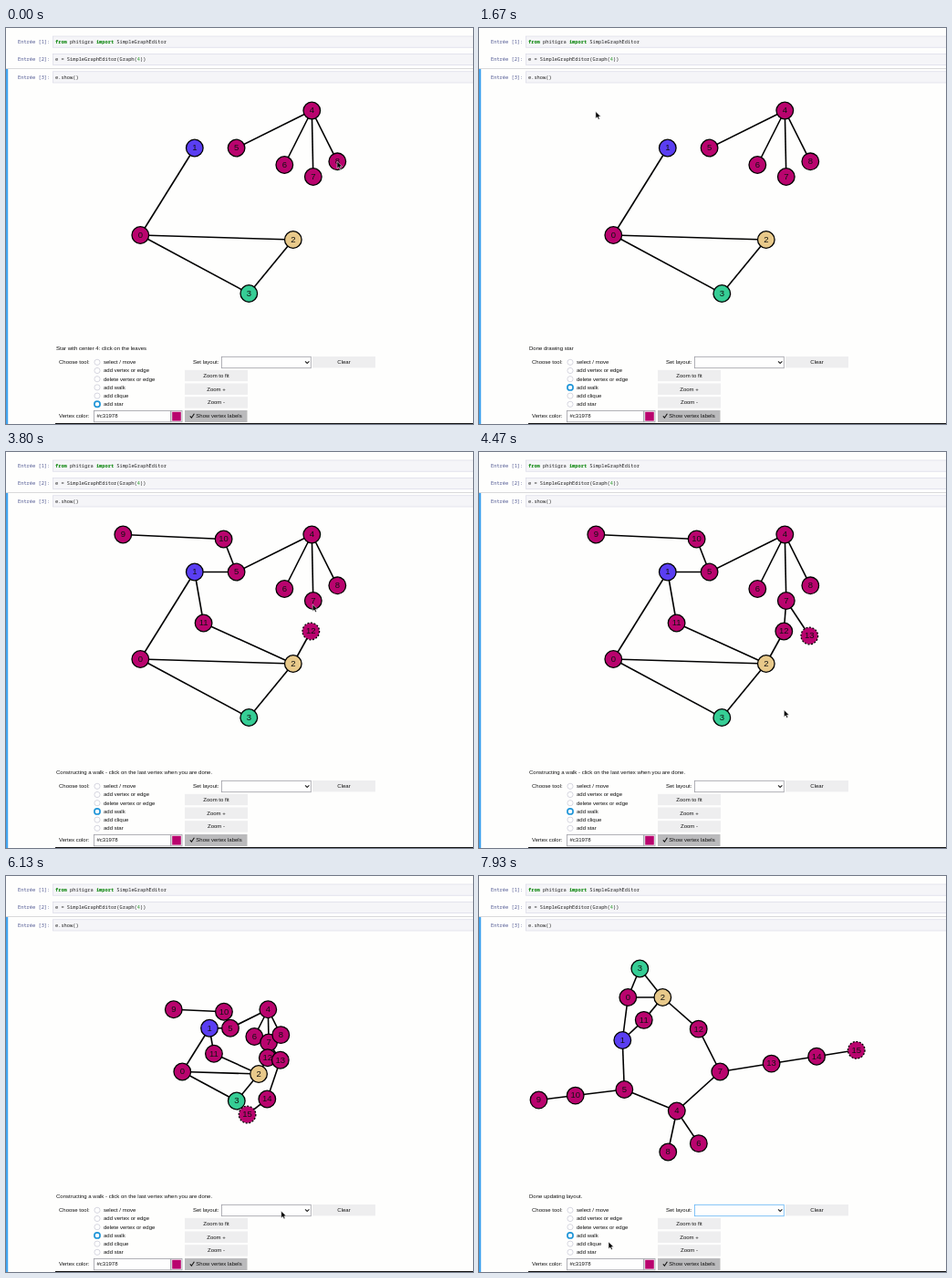
Write an HTML page that moves like this. It is 512x434 px and loops after 8 s.

```html
<!DOCTYPE html>
<html lang="fr">
<head>
<meta charset="utf-8">
<title>Graph editor</title>
<style>
  html, body { margin: 0; width: 100%; height: 100%; overflow: hidden; background: #fefefd; }
  svg { display: block; width: 512px; height: 434px; }
  text { font: 6px "Liberation Sans", Arial, sans-serif; fill: #111; white-space: pre; }
  .mid { text-anchor: middle; }
  .code { font: 5.35px "Noto Sans Mono", "DejaVu Sans Mono", monospace; fill: #222; }
  .prompt { fill: #4d5590; }
  .key { fill: #008000; font-weight: bold; }
  .num { fill: #2a9a2a; }
  .label { font-size: 9.5px; text-anchor: middle; }
  .cell { fill: #f5f5f8; stroke: #d6d6e4; stroke-width: .6; }
  .button { fill: #eeeeef; }
  .field { fill: #fefefe; stroke: #9e9ea6; stroke-width: .8; }
  .edge { stroke: #000; stroke-width: 1.6; }
  .node { stroke: #000; stroke-width: 1.3; }
  .item { fill: #77777f; }
  .pointer { fill: #000; stroke: #fff; stroke-width: .5; }
</style>
</head>
<body>
<svg id="stage" viewBox="0 0 512 434"></svg>
<script>
const LOOP = 8000;
const ACCENT = '#b9046e';
const STAR_DONE = 720, TOOL_AT = 1230, WALK_AT = 1750, WALK_STEP = 315;
const ZOOM_AT = 5650, OPEN_AT = 6230, PICK_AT = 6960, LAYOUT_AT = 7060;
const stage = document.getElementById('stage');

function set(node, attrs) {
  for (const name in attrs) node.setAttribute(name, attrs[name]);
}
function add(tag, attrs = {}, parent = stage, text = '') {
  const node = document.createElementNS('http://www.w3.org/2000/svg', tag);
  set(node, attrs);
  if (text) node.textContent = text;
  parent.append(node);
  return node;
}
const rect = (x, y, width, height, attrs, parent) =>
  add('rect', { x, y, width, height, ...attrs }, parent);
const label = (x, y, text, cls = '', parent) =>
  add('text', { x, y, class: cls }, parent, text);
const show = (node, visible) => set(node, { visibility: visible ? 'visible' : 'hidden' });

// Notebook cells
const cells = [
  [['key', 'from'], ['', ' phitigra '], ['key', 'import'], ['', ' SimpleGraphEditor']],
  [['', 'e = SimpleGraphEditor(Graph('], ['num', '4'], ['', '))']],
  [['', 'e.show()']]
];
cells.forEach((parts, i) => {
  const y = 9 + 19.4 * i;
  rect(51.5, y, 461, 12.2, { class: 'cell' });
  label(13, y + 8, `Entrée [${i + 1}]:`, 'code prompt');
  const line = label(54, y + 8, '', 'code');
  parts.forEach(([cls, text]) => add('tspan', { class: cls }, line, text));
});
rect(0, 44, 512, .8, { fill: '#d0d0d4' });
rect(0, 45, 2.2, 389, { fill: '#42a5f0' });

// Graph as drawn by hand, then extended by a walk
const drawn = [
  [147, 227], [206.5, 131.5], [314.5, 232], [266, 291], [335, 90.5], [252.3, 131.5],
  [305, 150], [336.5, 163], [363, 146.3], [128, 90.5], [238.3, 95.5], [216.3, 187.5],
  [334, 196.5], [362, 201.5], [333, 287], [289.5, 321]
];
const walk = [9, 10, 5, 1, 11, 2, 12, 7, 13, 14, 15];
const clickAt = i => WALK_AT + WALK_STEP * i;
const bornAt = vertex => vertex > 8 ? clickAt(walk.indexOf(vertex)) : 0;
const edges = [
  ...[1, 2, 3].map(b => ({ a: 0, b, at: 0 })),
  { a: 2, b: 3, at: 0 },
  ...[5, 6, 7, 8].map(b => ({ a: 4, b, at: 0 })),
  ...walk.slice(1).map((b, i) => ({ a: walk[i], b, at: clickAt(i + 1) }))
];

// Spring layout: hubs are fixed, the rest hangs between or off them
const spring = {
  0: [163, 133], 1: [157, 180], 2: [201, 133], 3: [176, 101.5],
  4: [216.5, 257.5], 5: [159, 234], 7: [264, 214.5]
};
function between(vertex, a, b, bulge) {
  const [x1, y1] = spring[a], [x2, y2] = spring[b];
  const k = bulge / Math.hypot(x2 - x1, y2 - y1);
  spring[vertex] = [(x1 + x2) / 2 + (y2 - y1) * k, (y1 + y2) / 2 - (x2 - x1) * k];
}
function arm(chain, root, degrees, length, shrink = 1) {
  const angle = degrees * Math.PI / 180;
  let [x, y] = spring[root];
  for (const vertex of chain) {
    x += length * Math.cos(angle);
    y += length * Math.sin(angle);
    spring[vertex] = [x, y];
    length *= shrink;
  }
}
between(11, 1, 2, -2);
between(12, 2, 7, 10);
arm([13, 14, 15], 7, -9, 57, .88);
arm([10, 9], 5, 173, 54, .75);
arm([8], 4, 102, 46);
arm([6], 4, 56, 43);

function place(vertex, t) {
  if (t >= LAYOUT_AT) return spring[vertex];
  const [x, y] = drawn[vertex];
  return t < ZOOM_AT ? [x, y] : [(x + 239) / 2, (y + 202) / 2];
}

const colors = { 1: '#5a3ef2', 2: '#e8c98a', 3: '#36cd95' };
const graph = add('g', { transform: 'translate(.3 0)' });
const edgeNodes = edges.map(() => add('line', { class: 'edge' }, graph));
const vertexNodes = drawn.map((_, i) => {
  const group = add('g', {}, graph);
  const circle = add('circle', { r: 9.3, class: 'node', fill: colors[i] || ACCENT }, group);
  label(0, 2.9, String(i), 'label', group);
  return { group, circle };
});

// Control panel
const status = label(55, 353, '');
label(58, 368, 'Choose tool:');
const radios = ['select / move', 'add vertex or edge', 'delete vertex or edge',
  'add walk', 'add clique', 'add star'].map((name, i) => {
  const y = 366.3 + 9.2 * i;
  label(107, y + 1.9, name);
  return add('circle', { cx: 100, cy: y, r: 3.1, fill: '#fefefe' });
});
label(205, 368, 'Set layout:');
const select = rect(236.5, 360.3, 97.8, 12.4, { class: 'field' });
add('path', { d: 'M328 365.3l2.2 2.2 2.2-2.2', fill: 'none', stroke: '#222', 'stroke-width': 1.1 });

function button(x, y, text) {
  rect(x, y, 69, 12.4, { class: 'button' });
  label(x + 34.5, y + 8.2, text, 'mid');
}
button(336, 360, 'Clear');
['Zoom to fit', 'Zoom +', 'Zoom -'].forEach((text, i) => button(196, 374.8 + 14.7 * i, text));

label(58, 427.3, 'Vertex color:');
rect(96.5, 419.5, 84, 12.3, { class: 'field' });
label(99.5, 427.4, '#c31978');
rect(181, 419.5, 12, 12.3, { class: 'field' });
rect(182.2, 420.7, 9.6, 9.9, { fill: ACCENT });
rect(196, 419, 68.5, 13, { fill: '#bababc' });
add('path', { d: 'M201.8 425.3l1.6 1.9 3-4.5', fill: 'none', stroke: '#111', 'stroke-width': 1.1 });
label(208.3, 427.3, 'Show vertex labels');
rect(54, 433, 458, 1, { fill: '#111' });

// Layout menu
const MENU_Y = 255.5, ROW = 13;
const menu = add('g');
rect(236.6, MENU_Y, 97.4, 105, { fill: '#fefefe', stroke: '#d8d8e0', 'stroke-width': .6 }, menu);
const highlight = rect(236.6, 0, 97.4, ROW, { fill: '#4590dc' }, menu);
const items = ['', 'random', 'spring', 'circular', 'planar', 'forest (root up)',
  'forest (root down)', 'directed acyclic']
  .map((name, i) => label(241, MENU_Y + 8.5 + ROW * i, name, 'item', menu));

// Pointer: glides from click to click
const pointer = add('g', { class: 'pointer' });
const arrow = add('path', { d: 'M0 0V7.6L1.8 6 3 8.6 4.3 8 3.2 5.5H5.6Z' }, pointer);
const hand = add('path', {
  d: 'M-.8 0Q0-.8.8 0V2.8L4 3.5Q4.8 4 4.4 5.5L3.6 7.8H-.4L-2.6 4.6Q-2.2 3.6-.8 4.6Z'
}, pointer);
const stops = [
  { at: 0, to: drawn[8] },
  { at: STAR_DONE, to: drawn[4] },
  { at: TOOL_AT, to: [100, 393] },
  ...walk.map((vertex, i) => ({ at: clickAt(i), to: drawn[vertex] })),
  { at: ZOOM_AT, to: [245, 409] },
  { at: OPEN_AT, to: [302, 367] },
  { at: PICK_AT, to: [266, 288] },
  { at: LOOP, to: [142, 401] }
];
function pointerAt(t) {
  const i = stops.findIndex(stop => stop.at > t);
  const from = stops[i - 1], next = stops[i];
  const ease = 1 - (1 - (t - from.at) / (next.at - from.at)) ** 3;
  return from.to.map((start, axis) => start + (next.to[axis] - start) * ease);
}

function statusAt(t) {
  if (t < STAR_DONE) return 'Star with center 4: click on the leaves';
  if (t < WALK_AT) return 'Done drawing star';
  if (t < LAYOUT_AT) return 'Constructing a walk - click on the last vertex when you are done.';
  return 'Done updating layout.';
}

function render(t) {
  const spots = drawn.map((_, i) => place(i, t));
  const active = walk.filter((_, i) => t >= clickAt(i)).pop();
  edges.forEach(({ a, b, at }, i) => {
    const [x1, y1] = spots[a], [x2, y2] = spots[b];
    set(edgeNodes[i], { x1, y1, x2, y2 });
    show(edgeNodes[i], t >= at);
  });
  vertexNodes.forEach(({ group, circle }, i) => {
    set(group, { transform: `translate(${spots[i]})` });
    set(circle, { 'stroke-dasharray': active === i ? '2 1.6' : 'none' });
    show(group, t >= bornAt(i));
  });

  status.textContent = statusAt(t);
  const tool = t < TOOL_AT ? 5 : 3;
  radios.forEach((radio, i) => set(radio, i === tool
    ? { stroke: '#2196d8', 'stroke-width': 1.7 }
    : { stroke: '#cdcdd8', 'stroke-width': .8 }));

  const [x, y] = pointerAt(t);
  const row = Math.floor((y - MENU_Y) / ROW);
  const hovered = items[row] ? row : 0;
  show(menu, t >= OPEN_AT && t < PICK_AT);
  set(highlight, { y: MENU_Y + ROW * hovered });
  items.forEach((item, i) => { item.style.fill = i === hovered ? '#fff' : ''; });
  select.style.stroke = t >= OPEN_AT ? '#64b5f6' : '';

  const overButton = x > 196 && x < 265 && y > 374 && y < 417;
  set(pointer, { transform: `translate(${x} ${y})` });
  show(arrow, !overButton);
  show(hand, overButton);
}

let start;
function tick(now) {
  start ??= now;
  render((now - start) % LOOP);
  requestAnimationFrame(tick);
}
render(0);
requestAnimationFrame(tick);
</script>
</body>
</html>
```
